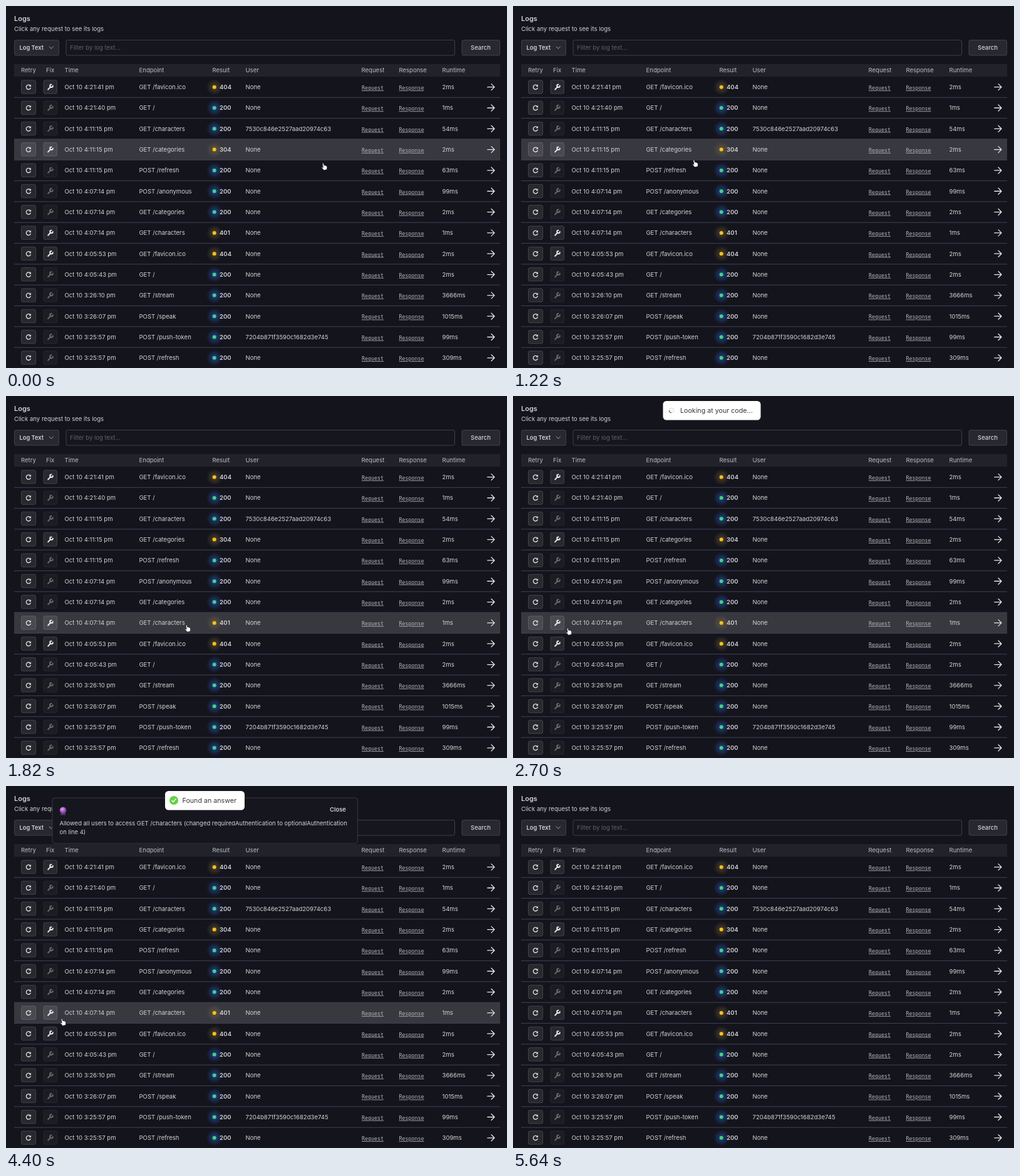
An HTML page for the animation above (5.78 s loop, 800x579 px).

```html
<!DOCTYPE html>
<html lang="en">
<head>
<meta charset="utf-8">
<title>Request logs</title>
<style>
html, body { margin: 0; width: 100%; height: 100%; overflow: hidden; background: #14141c; }
svg { display: block; width: 800px; height: 579px; font: 9.55px Inter, sans-serif; fill: #d2d2d6; }
.head { fill: #bcbcc4; }
.semi { font-weight: 600; }
.link { font: 8.3px "DejaVu Sans Mono", monospace; fill: #b4b4bb; text-decoration: underline; }
.btn { fill: #fff; fill-opacity: .085; stroke: #fff; stroke-opacity: .15; }
.line { fill: none; stroke: #e6e6ea; stroke-linecap: round; stroke-linejoin: round; }
.toast { font-size: 10.7px; fill: #363636; }
.popup { font-size: 9.45px; }
</style>
</head>
<body>
<svg viewBox="0 0 800 579" xmlns="http://www.w3.org/2000/svg">
  <defs>
    <radialGradient id="blue">
      <stop offset=".2" stop-color="#2450a8" stop-opacity=".6"/>
      <stop offset="1" stop-color="#2450a8" stop-opacity="0"/>
    </radialGradient>
    <radialGradient id="amber">
      <stop offset=".2" stop-color="#8a7440" stop-opacity=".38"/>
      <stop offset="1" stop-color="#8a7440" stop-opacity="0"/>
    </radialGradient>
    <radialGradient id="orb" cx=".4" cy=".35">
      <stop offset="0" stop-color="#e2a5ee"/>
      <stop offset="1" stop-color="#8d3fb4"/>
    </radialGradient>
  </defs>

  <text class="semi" x="13" y="23.5" style="font-size:11px">Logs</text>
  <text x="13" y="39.6">Click any request to see its logs</text>
  <rect class="btn" x="13.5" y="54.5" width="71" height="24.5" rx="2.5"/>
  <text class="semi" x="21.5" y="70" style="font-size:9.3px">Log Text</text>
  <path class="line" d="M69 65l3.2 3.2L75.400 65" stroke-opacity=".65"/>
  <rect x="96" y="54.500" width="620.5" height="24.500" rx="2.5" fill="#16161e" stroke="#3f3f48"/>
  <text x="102" y="70" fill="#61616a">Filter by log text...</text>
  <rect class="btn" x="728" y="54.5" width="60.5" height="24.5" rx="2.5"/>
  <text x="742" y="70" font-weight="500">Search</text>
  <rect x="13" y="93" width="776" height="20" fill="#22222b"/>
  <rect id="hover" x="13" width="776" height="33.3" fill="#38383f"/>
  <g id="table"></g>

  <g id="popup" class="popup">
    <rect x="74" y="19" width="487.500" height="73" rx="4" fill="#16161e" stroke="#393943"/>
    <path d="M86.500 46.500l1.500-4h6l1.500 4z" fill="#49405c"/>
    <circle cx="91" cy="38.800" r="5.300" fill="url(#orb)"/>
    <text class="semi" x="517" y="41">Close</text>
    <text x="85.500" y="63">Allowed all users to access GET /characters (changed requiredAuthentication to optionalAuthentication</text>
    <text x="85.500" y="77">on line 4)</text>
  </g>

  <g id="toast" class="toast">
    <g id="loading">
      <rect x="239.500" y="8" width="156" height="30.500" rx="5.500" fill="#fff"/>
      <g id="spinner" fill="none" stroke-width="1.300">
        <circle r="3.700" stroke="#e0e0e0"/>
        <path d="M2.600-2.600A3.700 3.700 0 0 1 2.600 2.600" stroke="#616161"/>
      </g>
      <text x="267" y="27">Looking at your code...</text>
    </g>
    <g id="success">
      <rect x="254" y="8" width="127" height="30.500" rx="5.500" fill="#fff"/>
      <g id="badge">
        <circle r="7" fill="#61d345"/>
        <path id="check" class="line" d="M-3 .2L-.900 2.500L3-2.200" stroke-width="1.500" style="stroke:#fff" pathLength="1"/>
      </g>
      <text x="281.500" y="27">Found an answer</text>
    </g>
  </g>

  <path id="cursor" fill="#fff" stroke="#101014" stroke-width=".7" stroke-linejoin="round"
    d="M-1 .6Q.3-.6 1 .8L1.9 4 2.6 3.3 3.8 4 4.4 3.7 5.3 4.7Q7 5 6.7 7L6.3 10.5 1.5 11.4Q0 9.6-2 7.6Q-2.8 6.4-1 6.6L.2 7.2Z"/>
</svg>

<script>
const LOOP = 5780, TOP = 113, PITCH = 33.32;
const $ = id => document.getElementById(id);

const rows = `4:21:41|GET /favicon.ico|404|2
4:21:40|GET /|200|1
4:11:15|GET /characters|200|54|7530c846e2527aad20974c63
4:11:15|GET /categories|304|2
4:11:15|POST /refresh|200|63
4:07:14|POST /anonymous|200|99
4:07:14|GET /categories|200|2
4:07:14|GET /characters|401|1
4:05:53|GET /favicon.ico|404|2
4:05:43|GET /|200|2
3:26:10|GET /stream|200|3666
3:26:07|POST /speak|200|1015
3:25:57|POST /push-token|200|99|7204b871f3590c1682d3e745
3:25:57|POST /refresh|200|309`.split("\n").map(line => line.split("|"));

const label = (x, y, text, cls = "") => `<text class="${cls}" x="${x}" y="${y}">${text}</text>`;

function rowMarkup([time, endpoint, code, ms, user = "None"], i) {
  const ok = code === "200";
  return `<g transform="translate(0 ${TOP + PITCH * (i + .5)})">
    <path d="M13 ${PITCH / 2}H789" stroke="#40405a"/>
    <rect class="btn" x="24.500" y="-11" width="23" height="21.500" rx="2.500"/>
    <g transform="translate(36 0)">
      <path class="line" d="M3.300 1.500A3.600 3.600 0 1 1 2.600-2.400" stroke-width="1.300"/>
      <path d="M4-4.200V-.700H.500z"/>
    </g>
    <g opacity="${ok ? .4 : 1}">
      <rect class="btn" x="60" y="-11" width="21.500" height="21.500" rx="2.500"/>
      <path class="line" transform="translate(70.500 .3)" stroke-width="2"
        d="M-3.300 3.500L.800-.900M4.300-2.200A2.300 2.300 0 1 1 2-4.500"/>
    </g>
    ${label(93.5, 3.4, `Oct 10 ${time} pm`)}
    ${label(212.5, 3.4, endpoint)}
    <circle cx="333" r="13" fill="url(#${ok ? "blue" : "amber"})"/>
    <circle cx="332.700" r="3" fill="${ok ? "#3fd383" : "#f6c21c"}"/>
    ${label(341, 3.5, code, "semi")}
    ${label(382.5, 3.4, user)}
    ${label(568, 4.3, "Request", "link")}
    ${label(627.5, 4.3, "Response", "link")}
    ${label(696.5, 3.4, ms + "ms")}
    <path class="line" d="M768.800 0H780M775-5L780 0L775 5" stroke-width="1.300"/>
  </g>`;
}

const columns = { Retry: 24, Fix: 64, Time: 93.5, Endpoint: 212.5, Result: 329.5, User: 382.5,
  Request: 567.5, Response: 627.5, Runtime: 696.5 };
$("table").innerHTML =
  Object.entries(columns).map(([name, x]) => label(x, 106.3, name, "head")).join("") +
  rows.map(rowMarkup).join("");

// Pointer tip: time, x, y
const path = [
  [-100, 495, 232], [0, 506, 251], [260, 542, 325], [460, 570, 352], [680, 562, 325],
  [880, 535, 291], [1060, 390, 199], [1220, 289, 246], [1500, 272, 335], [1800, 288, 366],
  [1880, 288, 366], [2220, 71, 361], [2360, 71, 361], [2640, 87, 371], [4100, 87, 371],
  [4220, 89, 372], [4420, 89, 372], [4720, 330, 180], [5000, 529, 36], [LOOP, 529, 36]
];

function slope(i, axis) {
  const a = path[i - 1], b = path[i], c = path[i + 1];
  if (!a || !c || (b[axis] - a[axis]) * (c[axis] - b[axis]) <= 0) return 0;
  return (c[axis] - a[axis]) / (c[0] - a[0]);
}

function pointer(t) {
  const i = path.findIndex(p => p[0] > t) - 1;
  const a = path[i], b = path[i + 1], span = b[0] - a[0], u = (t - a[0]) / span;
  return [1, 2].map(k => {
    const bend = (1 - u) * slope(i, k) - u * slope(i + 1, k);
    return a[k] + (b[k] - a[k]) * u * u * (3 - 2 * u) + u * (1 - u) * span * bend;
  });
}

const progress = (t, start, length) => Math.min(1, Math.max(0, (t - start) / length));
const easeOut = p => 1 - (1 - p) ** 3;
const show = (id, on) => $(id).style.display = on ? "" : "none";
const move = (id, value) => $(id).setAttribute("transform", value);
const scaleAt = (x, y, s, dy = 0) => `translate(${x} ${y + dy}) scale(${s}) translate(${-x} ${-y})`;

function draw(t) {
  const [x, y] = pointer(t);
  move("cursor", `translate(${x} ${y})`);
  show("cursor", t < 5600);

  // The row highlight trails the pointer slightly.
  const [hx, hy] = pointer(t - 40);
  const covered = t > 3800 && hx > 74 && hx < 562 && hy < 92;
  show("hover", hy >= TOP && !covered);
  $("hover").setAttribute("y", TOP + PITCH * Math.floor((hy - TOP) / PITCH));

  const shown = easeOut(progress(t, 3800, 250)) * (1 - progress(t, 5390, 220));
  $("popup").setAttribute("opacity", shown);
  move("popup", scaleAt(318, 55, .95 + .05 * shown));

  const enter = easeOut(progress(t, 2380, 300)), leave = easeOut(progress(t, 4520, 380));
  show("toast", t >= 2380 && leave < 1);
  $("toast").setAttribute("opacity", (.5 + .5 * enter) * (1 - leave));
  move("toast", scaleAt(317.7, 23, 1 - .4 * (1 - enter + leave), -61 * (1 - enter) - 46 * leave));

  const found = t >= 3800;
  show("loading", !found);
  show("success", found);
  move("spinner", `translate(253 23) rotate(${135 + (t - 2700) * .36})`);
  const grow = easeOut(progress(t, 3880, 220));
  move("badge", `translate(268 23) rotate(${45 * (grow - 1)}) scale(${grow})`);
  const drawn = progress(t, 4040, 180);
  $("check").setAttribute("stroke-dasharray", `${drawn} 2`);
  $("check").setAttribute("opacity", drawn > 0 ? 1 : 0);
}

function tick() {
  draw(performance.now() % LOOP);
  requestAnimationFrame(tick);
}
tick();
</script>
</body>
</html>
```
